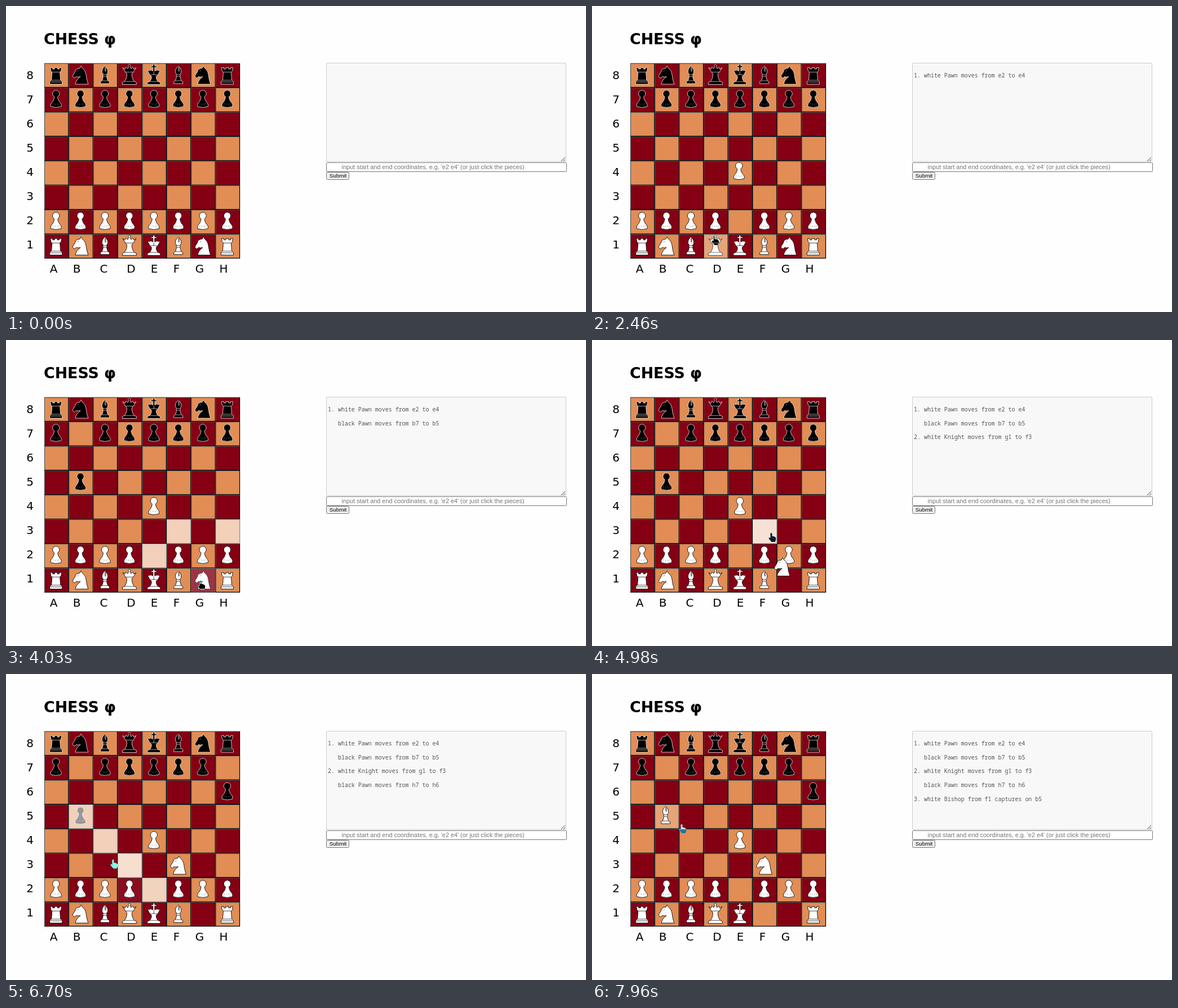
Animation, 1029 px wide and 544 px high, one loop 8000 ms. Source, as an HTML page with a canvas:

```html
<!DOCTYPE html>
<html lang="en">
<head>
<meta charset="utf-8">
<title>Chess</title>
<style>
  html, body { margin: 0; width: 100%; height: 100%; overflow: hidden; background: #fefefe; }
  canvas { display: block; width: 1029px; height: 544px; }
</style>
</head>
<body>
<canvas id="stage"></canvas>
<script>
const W = 1029, H = 544, LOOP = 8000, SLIDE = 500, HOVER_LAG = 30;
const X0 = 68, Y0 = 101.8, CELL = 43.4;
const PAGE = '#fefefe', LIGHT = '#e18d55', DARK = '#860014';
const SANS = '"DejaVu Sans", Verdana, sans-serif';
const ARIAL = '"Liberation Sans", Arial, sans-serif';
const MONO = '"Noto Sans Mono", monospace';

const canvas = document.getElementById('stage');
const dpr = window.devicePixelRatio || 1;
canvas.width = W * dpr;
canvas.height = H * dpr;
const ctx = canvas.getContext('2d');

// Outline and inner detail of each piece, centred on its square.
const shape = (outline, detail) => ({ outline: new Path2D(outline), detail: new Path2D(detail) });
const PIECES = {
  p: shape('M-3,-4.6 A6.2,6.2 0 1 1 3,-4.6 Q3.5,2 8.2,6.5 Q10.5,9.5 9,13 Q0,16 -9,13 Q-10.5,9.5 -8.2,6.5 Q-3.5,2 -3,-4.6Z',
    'M-6,8 h1 M-2,8.6 h1 M2,8.6 h1 M5,8 h1'),
  r: shape('M-10,-13 H-6 V-10.5 H-2.5 V-13 H2.5 V-10.5 H6 V-13 H10 L9,-7 L7,-5 L8,9 L11,12 V16.5 H-11 V12 L-8,9 L-7,-5 L-9,-7Z',
    'M-7,-5 H7 M-8,9.5 H8 M-10,12.5 H10'),
  n: shape('M-1,-12 L1,-16 L3.5,-12 Q9,-8 10,0 Q11,9 13.8,16.5 H-9 Q-8,9 0,3 Q-4,4.5 -7.5,3 L-10.5,5.5 Q-15,4 -13,0 Q-9,-5 -8.5,-9 Q-5.5,-12 -1,-12Z',
    'M-5,-7 l1.6,-.6'),
  b: shape('M0,-15.5 Q6,-11 5,-4 L3,-1 L3.8,1.5 L3,3 L5,10 L8,12 V15.5 H-8 V12 L-5,10 L-3,3 L-3.8,1.5 L-3,-1 L-5,-4 Q-6,-11 0,-15.5Z',
    'M0,-13 L1.6,-13 L1.6,-6.5 L.4,-6.5Z M-3,-.5 H3 M-3,2.6 H3 M-5,10.5 H5'),
  q: shape('M-12,-13 L-8,-10 L-6,-14 L-3,-11 L-1,-15 A2,2 0 1 1 1,-15 L3,-11 L6,-14 L8,-10 L12,-13 L7,-5 L4.5,-2.5 Q4,6 8.5,11.5 L12.5,13.5 V17 H-12.5 V13.5 L-8.5,11.5 Q-4,6 -4.5,-2.5 L-7,-5Z',
    'M-7,-5 H7 M-8.5,11.8 H8.5'),
  k: shape('M-1.5,-19 H1.5 V-16 H5 V-13.5 H1.5 V-7 L5,-8.5 L11,-7.5 L7,0 L4,3 Q4,8 7,11.5 L11.5,13.5 V17 H-11.5 V13.5 L-7,11.5 Q-4,8 -4,3 L-7,0 L-11,-7.5 L-5,-8.5 L-1.5,-7 V-13.5 H-5 V-16 H-1.5Z',
    'M0,-6 V0 M-7,.5 Q0,-2 7,.5 M-7,11.8 H7')
};
const HAND = new Path2D('M-1.5,1 Q0,-1 1.5,1 V5.5 L4.2,6 L6.5,7 L8.2,8.6 V12 L6.8,16 H.5 L-4.2,10.2 Q-5,8.2 -3,8 L-1.5,9.6Z');
const ARROW = new Path2D('M0,0 L7.5,8.5 H4.6 L6.2,13 L4.4,13.8 L2.7,9.4 L0,12Z');

const MOVES = [
  { piece: 'P', from: 'e2', to: 'e4', t: 1700, snap: 2600, log: '1. white Pawn moves from e2 to e4' },
  { piece: 'p', from: 'b7', to: 'b5', t: 2550, snap: 3060, log: '   black Pawn moves from b7 to b5' },
  { piece: 'N', from: 'g1', to: 'f3', t: 4850, snap: 5500, log: '2. white Knight moves from g1 to f3' },
  { piece: 'p', from: 'h7', to: 'h6', t: 5110, snap: 5800, log: '   black Pawn moves from h7 to h6' },
  { piece: 'B', from: 'f1', to: 'b5', t: 7400, snap: 8000, log: '3. white Bishop from f1 captures on b5' }
];
const HINTS = [
  { from: 1240, to: 1700, cells: ['e3', 'e4'] },
  { from: 3960, to: 4850, cells: ['e2', 'f3', 'h3'] },
  { from: 6290, to: 7400, cells: ['e2', 'd3', 'c4', 'b5'] }
];
const PRESSES = [['e2', 1380], ['e4', 1700], ['f3', 4940], ['b5', 7430]];
// Pointer tip: time, x, y
const POINTER = [
  [210, 636, 451], [350, 507, 408], [550, 507, 408], [900, 330, 385], [1240, 264, 374],
  [1380, 264, 374], [1650, 262, 298], [1800, 262, 298], [2120, 258, 372], [2260, 222, 410],
  [2460, 217, 409], [2990, 180, 425], [3500, 395, 405], [3830, 345, 428], [4060, 345, 428],
  [4520, 318, 343], [5200, 318, 343], [5610, 310, 400], [6020, 303, 430], [6330, 303, 430],
  [6700, 190, 330], [7040, 140, 250], [7400, 142, 250], [7900, 150, 263], [7960, 159, 267]
];

const lerp = (a, b, k) => a + (b - a) * k;
const clamp = k => Math.max(0, Math.min(1, k));
const center = id => ({
  x: X0 + CELL * (id.charCodeAt(0) - 96.5),
  y: Y0 + CELL * (8.5 - id[1])
});

function pointerAt(t) {
  if (t < POINTER[0][0]) return null;
  const i = POINTER.findIndex(p => p[0] > t);
  if (i < 0) return { x: POINTER.at(-1)[1], y: POINTER.at(-1)[2] };
  const a = POINTER[i - 1], b = POINTER[i], k = (t - a[0]) / (b[0] - a[0]);
  return { x: lerp(a[1], b[1], k), y: lerp(a[2], b[2], k) };
}

function squareAt(p) {
  if (!p) return '';
  const c = Math.floor((p.x - X0) / CELL), r = Math.floor((p.y - Y0) / CELL);
  return c < 0 || c > 7 || r < 0 || r > 7 ? '' : 'abcdefgh'[c] + (8 - r);
}

function boardAt(t) {
  const board = {}, sliding = [];
  [...'abcdefgh'].forEach((f, i) => {
    board[f + 8] = 'rnbqkbnr'[i];
    board[f + 7] = 'p';
    board[f + 2] = 'P';
    board[f + 1] = 'RNBQKBNR'[i];
  });
  for (const m of MOVES) {
    if (t < m.t) continue;
    delete board[m.from];
    delete board[m.to];
    if (t >= m.snap) board[m.to] = m.piece;
    else sliding.push(m);
  }
  return { board, sliding };
}

function text(str, x, y, font, color = '#000', align = 'left') {
  ctx.font = font;
  ctx.fillStyle = color;
  ctx.textAlign = align;
  ctx.fillText(str, x, y);
}

function box(x, y, w, h, r, fill, stroke) {
  ctx.beginPath();
  ctx.roundRect(x + .5, y + .5, w - 1, h - 1, r);
  ctx.fillStyle = fill;
  ctx.fill();
  ctx.strokeStyle = stroke;
  ctx.lineWidth = 1;
  ctx.stroke();
}

function drawPiece(piece, x, y) {
  const white = piece < 'a', p = PIECES[piece.toLowerCase()];
  ctx.save();
  ctx.translate(x - 1, y - 1);
  ctx.lineJoin = 'round';
  ctx.fillStyle = white ? '#fff' : '#000';
  ctx.strokeStyle = white ? '#000' : '#e8e4e0';
  ctx.lineWidth = .85;
  ctx.fill(p.outline);
  ctx.stroke(p.outline);
  ctx.lineWidth = .7;
  ctx.stroke(p.detail);
  ctx.restore();
}

function opacity(id, t, trail, hints) {
  const hover = trail.filter(s => s === id).length / trail.length;
  const hint = hints.includes(id);
  let a = lerp(hint ? .4 : 1, hint ? .2 : .8, hover);
  for (const [cell, at] of PRESSES) {
    if (cell === id) a *= 1 - .95 * clamp(1 - Math.abs(t - at) / 150);
  }
  return a;
}

function drawSquare(x, y, color) {
  ctx.fillStyle = '#000';
  ctx.fillRect(x, y, CELL, CELL);
  ctx.fillStyle = '#404a48';
  ctx.fillRect(x, y, CELL - 1.3, CELL - 1.3);
  ctx.fillStyle = color;
  ctx.fillRect(x + 1, y + 1, CELL - 2.3, CELL - 2.3);
}

function drawBoard(t) {
  const { board, sliding } = boardAt(t);
  const hint = HINTS.find(h => t >= h.from && t < h.to);
  const hints = hint ? hint.cells : [];
  const trail = Array.from({ length: 8 }, (_, i) => squareAt(pointerAt(t - HOVER_LAG - i * 20)));

  for (let r = 0; r < 8; r++) for (let c = 0; c < 8; c++) {
    const id = 'abcdefgh'[c] + (8 - r), x = X0 + c * CELL, y = Y0 + r * CELL;
    drawSquare(x, y, (r + c) % 2 ? DARK : LIGHT);
    if (board[id]) drawPiece(board[id], x + CELL / 2, y + CELL / 2);
    ctx.globalAlpha = 1 - opacity(id, t, trail, hints);
    ctx.fillStyle = PAGE;
    ctx.fillRect(x, y, CELL, CELL);
    ctx.globalAlpha = 1;
  }

  for (const m of sliding) {
    const a = center(m.from), b = center(m.to), k = clamp((t - m.t) / SLIDE);
    drawPiece(m.piece, lerp(a.x, b.x - 1.5, k), lerp(a.y, b.y - 2, k));
  }
}

function drawPage(t) {
  text('CHESS φ', 67, 67.5, `bold 26.8px ${SANS}`);
  for (let i = 0; i < 8; i++) text(8 - i, 42.5, 129.5 + i * 43.1, `20px ${SANS}`, '#000', 'center');
  [84.5, 125.5, 173.5, 222, 263, 302.5, 343.5, 386].forEach((x, i) =>
    text('ABCDEFGH'[i], x, 474, `20px ${SANS}`, '#000', 'center'));

  box(568, 101, 426, 176, 1.5, '#f8f8f8', '#ccc');
  ctx.strokeStyle = '#444';
  ctx.beginPath();
  ctx.moveTo(985, 276); ctx.lineTo(992, 269);
  ctx.moveTo(989, 276); ctx.lineTo(992, 273);
  ctx.stroke();
  MOVES.forEach((m, row) => {
    if (t >= m.t) text(m.log, 571, 126.7 + row * 24.8, `9.97px ${MONO}`, '#555');
  });

  box(568, 278, 427, 17, 1, '#fff', '#767676');
  text("input start and end coordinates, e.g. 'e2 e4' (or just click the pieces)",
    595.5, 290, `10.87px ${ARIAL}`, '#757575');
  box(568, 295, 41, 14, 2, '#efefef', '#767676');
  text('Submit', 589, 305.4, `9.8px ${ARIAL}`, '#000', 'center');
}

function drawPointer(t) {
  const p = pointerAt(t);
  if (!p) return;
  ctx.save();
  ctx.globalCompositeOperation = 'difference';
  ctx.fillStyle = '#fff';
  ctx.translate(p.x, p.y);
  ctx.fill(squareAt(p) ? HAND : ARROW);
  ctx.restore();
}

function frame(now) {
  const t = now % LOOP;
  ctx.setTransform(dpr, 0, 0, dpr, 0, 0);
  ctx.fillStyle = PAGE;
  ctx.fillRect(0, 0, W, H);
  drawPage(t);
  drawBoard(t);
  drawPointer(t);
}

const start = performance.now();
function tick() {
  frame(performance.now() - start);
  requestAnimationFrame(tick);
}
tick();
</script>
</body>
</html>
```
